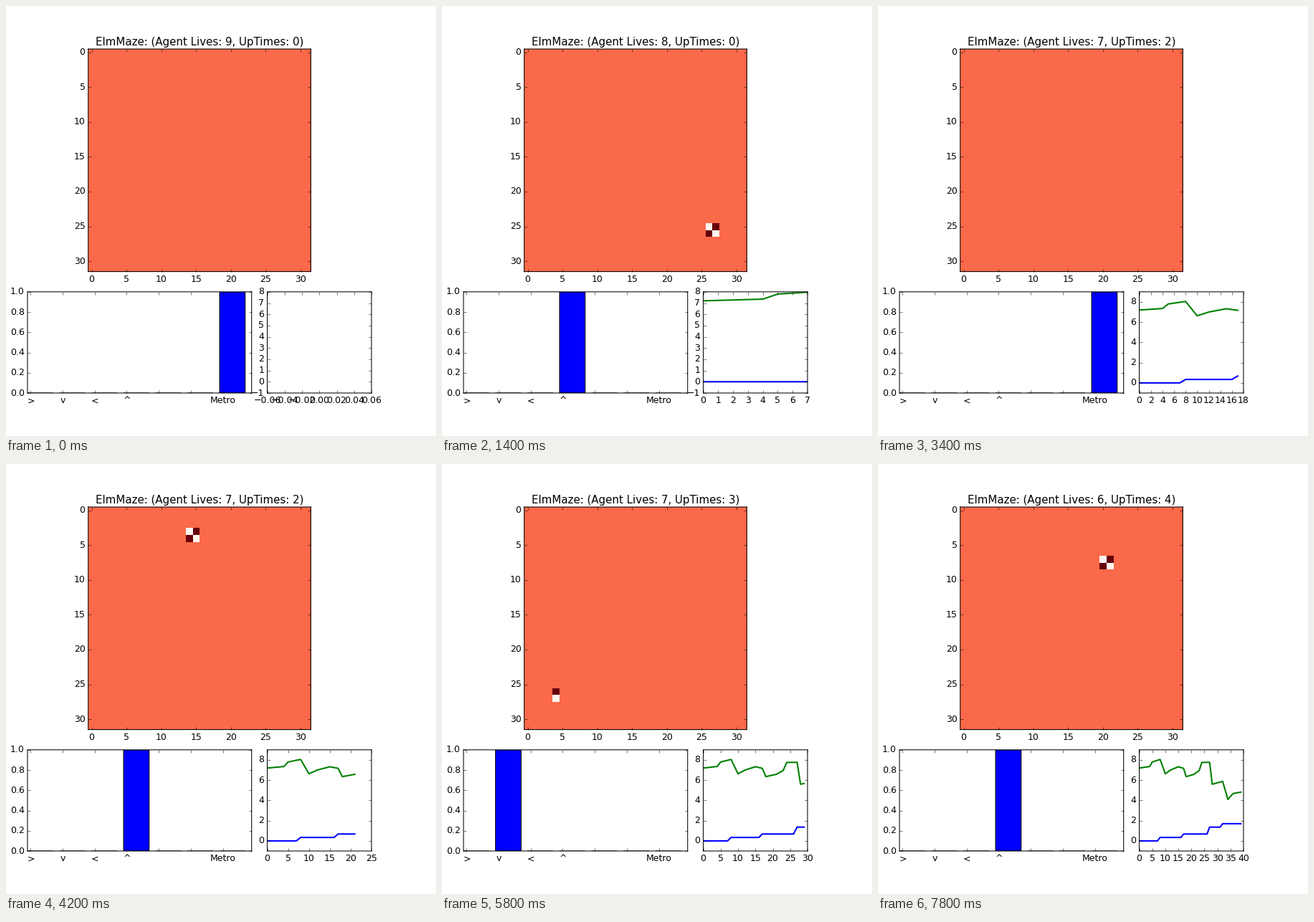
Recreate the animation shown at these times as a matplotlib script. Size 600 px wide and 600 px high, loop 8000 ms.

```python
import numpy as np
import matplotlib.pyplot as plt
from matplotlib.animation import FuncAnimation
from matplotlib.gridspec import GridSpec

plt.style.use("classic")
plt.rcParams.update({
    "font.family": "DejaVu Sans",
    "savefig.dpi": "figure",
    "lines.linewidth": 2,
    "path.snap": False,
})

SIZE = 32
STEPS = 40
LABELS = [">", "v", "<", "^", "", "", "Metro"]
MOVES = {">": (0, 1), "v": (1, 0), "<": (0, -1), "^": (-1, 0)}

# Every walk follows this path; its first move lands on the start cell.
PATH = ">v<^^>>v<"

# Metro steps and the cell where the next walk begins
STARTS = {0: (12, 9), 3: (25, 27), 8: (18, 22), 12: (10, 6),
          17: (3, 15), 27: (26, 4), 32: (15, 28), 35: (7, 21)}

KNOTS = [(0, 7.2), (4, 7.35), (5, 7.8), (8, 8.05), (10, 6.63), (12, 7.0),
         (15, 7.33), (17, 7.17), (18, 6.35), (21, 6.58), (23, 6.95),
         (24, 7.75), (27, 7.77), (28, 5.6), (32, 5.88), (34, 4.1),
         (36, 4.68), (39, 4.82)]
ENERGY = np.interp(range(STEPS), *zip(*KNOTS))


def score(n):
    """Lives, accepted loops and gain: a walk of four cells or more closes."""
    lives, ups, gain = 9, 0, 0.0
    metros = [m for m in STARTS if m <= n]
    for begin, end in zip(metros, metros[1:]):
        cells = end - begin - 1
        if cells >= 4:
            ups += 1
            gain += 0.34 * (cells // 4)
        else:
            lives -= 1
    return lives, ups, gain


def walk(n):
    """Current action and the map of alternating signs along the walk."""
    grid = np.zeros((SIZE, SIZE))
    metro = max(m for m in STARTS if m <= n)
    if n == metro:
        return "Metro", grid
    moves = PATH[:n - metro]
    cell, sign = np.array(STARTS[metro]), 1
    grid[tuple(cell)] = sign
    for move in moves[1:]:
        cell, sign = cell + MOVES[move], -sign
        grid[tuple(cell)] = sign
    return moves[-1], grid


GAIN = [score(n)[2] for n in range(STEPS)]

fig = plt.figure(figsize=(8, 8), dpi=75, facecolor="white")
layout = GridSpec(3, 3, left=0.05, right=0.85, bottom=0.1, top=0.9,
                  wspace=0.15, hspace=0.2)
board = fig.add_subplot(layout[:2, :])
policy = fig.add_subplot(layout[2, :2])
chart = fig.add_subplot(layout[2, 2])

image = board.imshow(np.zeros((SIZE, SIZE)), cmap="Reds", vmin=-1, vmax=1,
                     interpolation="nearest")
title = board.set_title("")

slots = np.arange(len(LABELS))
bars = policy.bar(slots - 0.1, np.zeros(len(LABELS)), 0.8, align="edge",
                  color="b", edgecolor="k")
policy.set_xlim(-0.1, 6.9)
policy.set_ylim(0, 1)
policy.set_xticks(slots)
policy.set_xticklabels(LABELS)

gain_line, = chart.plot([], [], "b")
energy_line, = chart.plot([], [], "g")


def update(n):
    action, grid = walk(n)
    lives, ups, _ = score(n)
    image.set_data(grid)
    title.set_text(f"ElmMaze: (Agent Lives: {lives}, UpTimes: {ups})")

    for label, bar in zip(LABELS, bars):
        bar.set_height(float(label == action))

    past = np.arange(n + 1)
    gain_line.set_data(past, GAIN[:n + 1])
    energy_line.set_data(past, ENERGY[:n + 1])
    chart.relim()
    chart.autoscale_view(scaley=False)
    chart.set_ylim(-1, int(ENERGY[:n + 1].max()) + 1)
    return image, title, gain_line, energy_line, *bars


anim = FuncAnimation(fig, update, frames=STEPS, interval=200,
                     init_func=lambda: update(0), repeat=True, repeat_delay=0)
plt.show()
```
